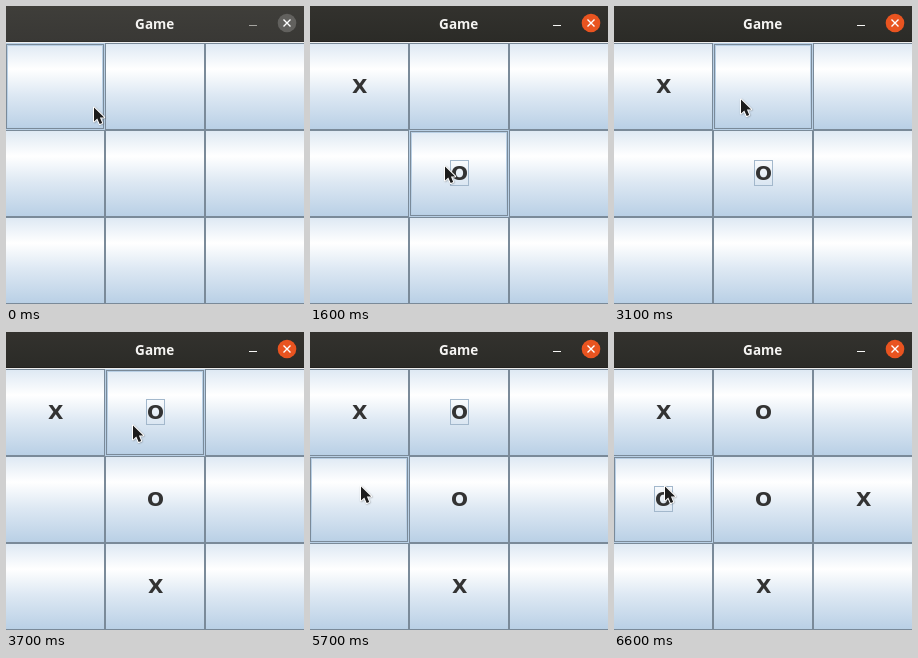
These frames come from a looping animation (298 px wide and 298 px high, 8000 ms). An HTML page with a canvas:

```html
<!DOCTYPE html>
<html lang="en">
<head>
<meta charset="utf-8">
<title>Game</title>
<style>
  html, body { margin: 0; width: 100%; height: 100%; overflow: hidden; background: #eee; }
  canvas { display: block; }
</style>
</head>
<body>
<canvas id="stage" width="298" height="298"></canvas>
<script>
const ctx = document.getElementById('stage').getContext('2d');
const LOOP = 8000, TICK = 100;
const CELL_W = 100, CELL_H = 87, LEFT = -1, TOP = 37;
const EDGE = '#7a8a99', PALE = '#b8cfe5', MIST = '#dde8f3', FOCUS = '#a3b8cc';

// Each move takes `steps` ticks; the first step shows at `start`.
const START = [87, 100];
const moves = [
  { start: 100, steps: 3, to: [112, 106] },
  { start: 700, steps: 3, to: [134, 159] },
  { start: 2300, steps: 9, to: [126, 92] },
  { start: 4800, steps: 1, to: [126, 93] },
  { start: 5100, steps: 7, to: [50, 153] }
];
const ACTIVATE = 1400;
const presses = [
  { down: 1500, up: 1600, cell: 4 },
  { down: 3600, up: 3700, cell: 1 },
  { down: 6400, up: 6500, cell: 3 }
];
const marks = [
  { at: 1600, cell: 0, text: 'X' },
  { at: 1600, cell: 4, text: 'O' },
  { at: 3700, cell: 1, text: 'O' },
  { at: 3700, cell: 7, text: 'X' },
  { at: 6500, cell: 3, text: 'O' },
  { at: 6600, cell: 5, text: 'X' }
];

function fill(color, x, y, w, h) {
  ctx.fillStyle = color;
  ctx.fillRect(x, y, w, h);
}

function outline(color, x, y, w, h) {
  ctx.strokeStyle = color;
  ctx.lineWidth = 1;
  ctx.strokeRect(x + 0.5, y + 0.5, w - 1, h - 1);
}

function gradient(y, h, stops) {
  const g = ctx.createLinearGradient(0, y, 0, y + h);
  for (const [pos, color] of stops) g.addColorStop(pos, color);
  return g;
}

function pointerAt(t) {
  let [x, y] = START;
  for (const { start, steps, to } of moves) {
    if (t < start) break;
    const s = Math.min(1, (Math.floor((t - start) / TICK) + 1) / steps);
    const k = s * s * (3 - 2 * s);
    x += (to[0] - x) * k;
    y += (to[1] - y) * k;
  }
  return [Math.round(x), Math.round(y)];
}

function cellAt([x, y]) {
  const col = Math.floor((x + 1 - LEFT) / CELL_W);
  const row = Math.floor((y + 1 - TOP) / CELL_H);
  return row * 3 + col;
}

function drawTitleBar(active) {
  fill(gradient(0, 36, active
    ? [[0, '#33322e'], [1, '#2b2b27']]
    : [[0, '#3f3e3a'], [1, '#393835']]), 0, 0, 298, 36);
  fill(active ? '#22211f' : '#302f2c', 0, 35, 298, 1);

  ctx.font = 'bold 13.5px "Open Sans", sans-serif';
  ctx.textAlign = 'center';
  ctx.fillStyle = '#f5f4f2';
  ctx.fillText('Game', 148.7, 23);

  fill(active ? '#f7f7f5' : '#a5a4a0', 243, 19, 8, 1);
  ctx.fillStyle = active ? '#e95420' : '#62615e';
  ctx.beginPath();
  ctx.arc(281, 17, 9.3, 0, Math.PI * 2);
  ctx.fill();
  ctx.strokeStyle = '#fff';
  ctx.lineWidth = 1.4;
  ctx.beginPath();
  ctx.moveTo(277.5, 13.5); ctx.lineTo(284.5, 20.5);
  ctx.moveTo(284.5, 13.5); ctx.lineTo(277.5, 20.5);
  ctx.stroke();
}

function drawCell(index, { text, hovered, pressed, focused }) {
  const x = LEFT + (index % 3) * CELL_W;
  const y = TOP + Math.floor(index / 3) * CELL_H;
  const w = CELL_W, h = CELL_H;

  fill(pressed ? PALE : gradient(y, h,
    [[0, MIST], [0.3, '#fff'], [0.6, MIST], [1, PALE]]), x, y, w, h);

  if (hovered && !pressed) {
    outline(PALE, x, y, w, h);
    outline(EDGE, x + 1, y + 1, w - 2, h - 2);
    outline(PALE, x + 2, y + 2, w - 4, h - 4);
  } else {
    outline(EDGE, x, y, w, h);
    if (pressed) outline(EDGE, x + 1, y + 1, w, h);
  }

  if (!text) return;
  ctx.font = 'bold 20px "DejaVu Sans", sans-serif';
  ctx.textAlign = 'left';
  ctx.fillStyle = '#333';
  ctx.fillText(text, x + (text === 'X' ? 43 : 42), y + 50);
  if (focused) outline(FOCUS, x + 41, y + 30, 19, 26);
}

function drawPointer([x, y]) {
  const shape = [[1, 1.5], [1, 15.5], [4.3, 12.5], [6.7, 18], [9.2, 16.9], [6.9, 11.6], [11.2, 11.4]];
  ctx.beginPath();
  for (const [dx, dy] of shape) ctx.lineTo(x + dx, y + dy);
  ctx.closePath();
  ctx.lineJoin = 'round';
  ctx.lineWidth = 2;
  ctx.strokeStyle = '#fff';
  ctx.shadowColor = 'rgba(0, 0, 0, 0.3)';
  ctx.shadowBlur = 1.5;
  ctx.shadowOffsetX = ctx.shadowOffsetY = 0.5;
  ctx.stroke();
  ctx.shadowColor = 'transparent';
  ctx.fillStyle = '#1c1c1c';
  ctx.fill();
  ctx.lineJoin = 'miter';
}

function draw(t) {
  const pointer = pointerAt(t);
  const hover = cellAt(pointer);
  const lastPress = presses.filter(p => t >= p.down).pop();

  fill('#eee', 0, 0, 298, 298);
  drawTitleBar(t >= ACTIVATE);
  for (let i = 0; i < 9; i++) {
    const mark = marks.find(m => m.cell === i && t >= m.at);
    const focused = lastPress?.cell === i;
    drawCell(i, {
      text: mark?.text,
      hovered: hover === i,
      pressed: focused && t < lastPress.up,
      focused
    });
  }
  drawPointer(pointer);
}

const began = performance.now();
function frame() {
  draw((performance.now() - began) % LOOP);
  requestAnimationFrame(frame);
}
frame();
</script>
</body>
</html>
```
